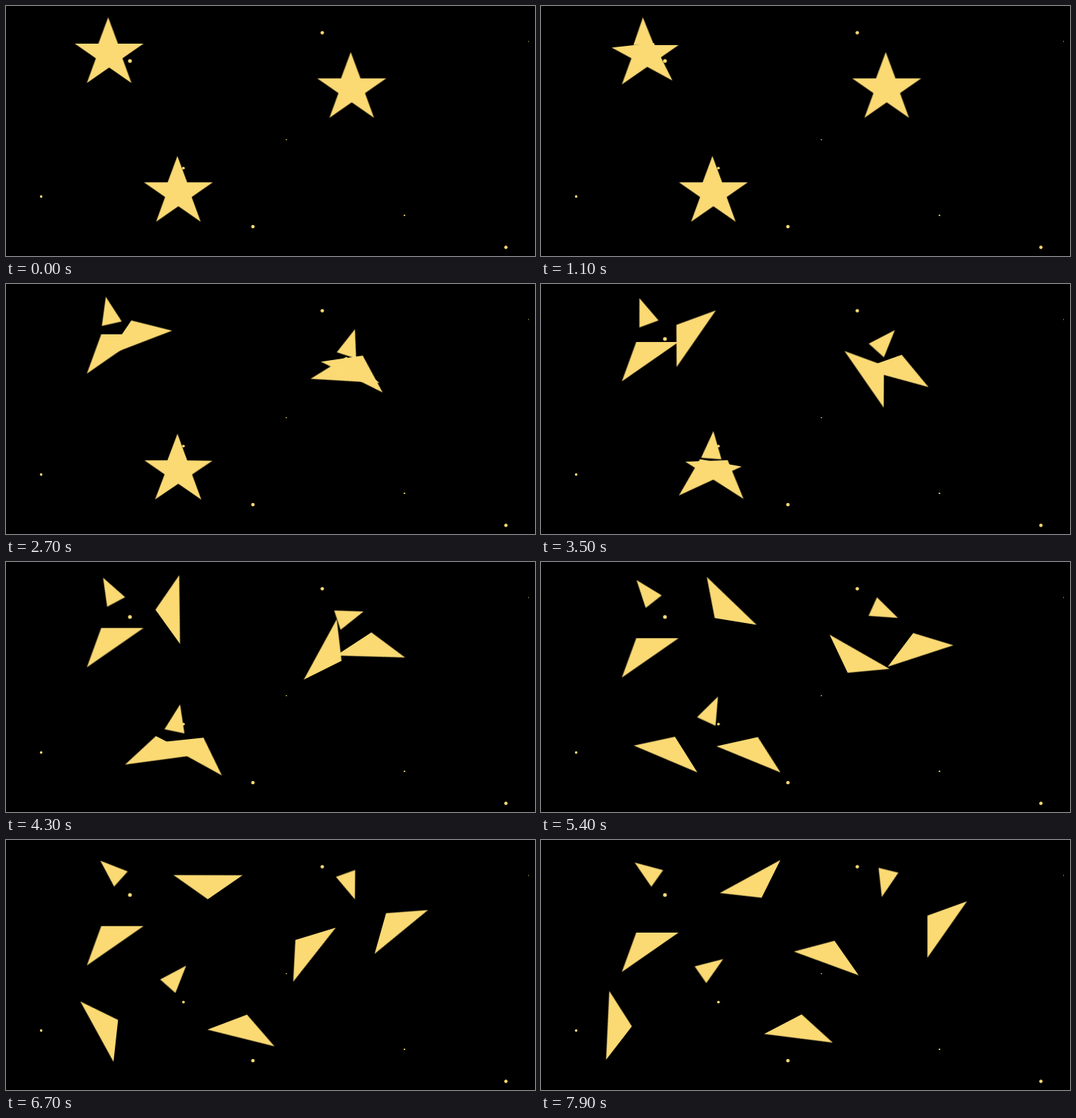
An HTML page for the animation above (8000 ms loop, 700 px wide and 332 px high).

```html
<!DOCTYPE html>
<html lang="en">
<head>
<meta charset="utf-8">
<title>Breaking stars</title>
<style>
  html, body { margin: 0; width: 100%; height: 100%; overflow: hidden; background: #000; }
  svg { display: block; width: 100%; height: 100%; fill: #fbda74; }
  polygon { animation: drift 10s cubic-bezier(.256, 0, .5, 1) var(--wait) both paused; }
  .left  { transform-origin: -.8px 63px; }
  .right { transform-origin: 1.7px 63px; }
  .top   { transform-origin: -1.3px 33.2px; }
  @keyframes drift {
    from { transform: translate(0, 0) rotate(0deg); }
    to   { transform: translate(var(--x), var(--y)) rotate(var(--turn)); }
  }
</style>
</head>
<body>
<svg viewBox="0 0 700 332">
  <g id="stars"></g>
  <circle cx="164" cy="73" r="2.5"/>
  <circle cx="418.5" cy="35.5" r="2.3"/>
  <circle cx="691.5" cy="47" r=".6"/>
  <circle cx="371" cy="177.5" r=".8"/>
  <circle cx="234.8" cy="215.2" r="1.8"/>
  <circle cx="46.5" cy="253" r="1.7"/>
  <circle cx="326.7" cy="293" r="2.3"/>
  <circle cx="527.3" cy="278" r="1.1"/>
  <circle cx="661.5" cy="320.5" r="2.2"/>
</svg>
<script>
const LOOP = 8000;

// A star is two mirrored arms and a tip, drawn around its vertical axis
const arm = [[-29.5, 102.3], [-10.5, 50], [45.5, 50]];
const shapes = {
  left: arm,
  right: arm.map(([x, y]) => [-x, y]),
  top: [[-1.3, 15], [-14.8, 51.4], [12.2, 51.4]]
};

function piece(name, wait, [x, y, turn]) {
  return `<polygon class="${name}" points="${shapes[name]}"
    style="--wait:${wait}s; --x:${x}px; --y:${y}px; --turn:${turn}deg"/>`;
}

// Place, delay in seconds, then the drift and turn of each piece
function star(x, y, wait, moves) {
  const parts = Object.keys(moves).map(name => piece(name, wait, moves[name]));
  return `<g transform="translate(${x} ${y})">${parts.join('')}</g>`;
}

document.getElementById('stars').innerHTML =
  star(136.5, 0, .4, { left: [0, 80, 0], right: [160, 0, -267], top: [4, 8, -60] }) +
  star(457.5, 46.2, 1.4, { left: [-89, 48.5, 503], right: [79, 0, -109], top: [-1, -26, 235] }) +
  star(228.1, 184.2, 2.4, { left: [-174, 0, 180], right: [160, 0, -39], top: [-1, -69, 78] });

// The flights are cut off before they end, so the clock sets their time
const flights = document.getAnimations();
const start = performance.now();

function tick(now) {
  const t = Math.max(0, now - start) % LOOP;
  for (const flight of flights) flight.currentTime = t;
  requestAnimationFrame(tick);
}
requestAnimationFrame(tick);
</script>
</body>
</html>
```
